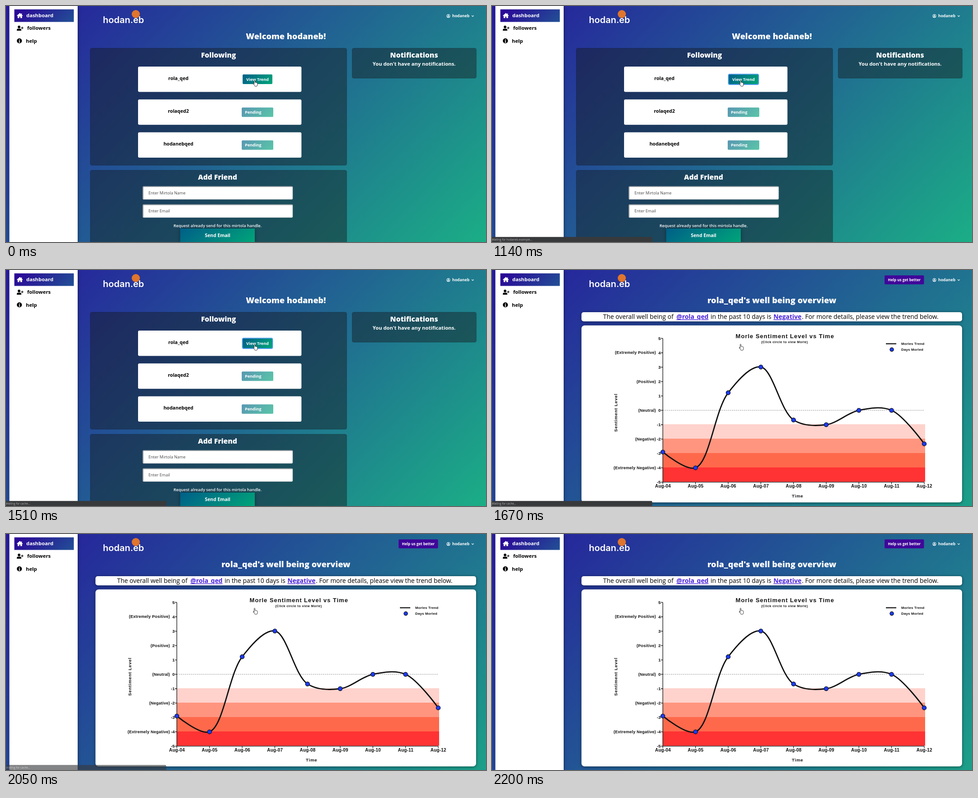
Recreate the animation shown at these times as an HTML page. Size 1065 by 526 pixels, loop 2.37 s.

```html
<!DOCTYPE html>
<html lang="en">
<head>
<meta charset="utf-8">
<title>Well being dashboard</title>
<style>
  html, body { margin: 0; width: 100%; height: 100%; overflow: hidden; background: #fff; }
  svg { display: block; width: 1065px; height: 526px; }
  text { font-family: "Open Sans", sans-serif; white-space: pre; }
  .mid { text-anchor: middle; }
  .white { fill: #fff; }
  .h3 { font-size: 18.1px; font-weight: 800; }
  .h4 { font-size: 15.7px; font-weight: 800; }
  .nav { font-size: 11.3px; font-weight: 700; }
  .friend { font-size: 10.6px; font-weight: 700; }
  .button { font-size: 9.1px; font-weight: 700; }
  .small { font-size: 9px; }
  .overview { font-size: 13.9px; font-weight: 500; }
  .link { font-weight: 700; fill: #4a22dc; text-decoration: underline; }
  .panel { fill: rgba(20, 25, 30, .45); stroke: rgba(0, 0, 0, .12); stroke-width: 2; }
  .card { fill: #fff; filter: drop-shadow(0 1px 3px rgba(0, 0, 0, .5)); }
  #chart text { font-family: "Liberation Sans", Arial, sans-serif; font-weight: 700; fill: #111; }
</style>
</head>
<body>
<svg viewBox="0 0 1065 526">
  <defs>
    <linearGradient id="homeSky" gradientUnits="userSpaceOnUse" x1="134.75" y1="-134.75" x2="930.25" y2="660.75">
      <stop stop-color="#271a9e"/><stop offset="1" stop-color="#1bae86"/>
    </linearGradient>
    <linearGradient id="trendSky" gradientUnits="userSpaceOnUse" x1="91.25" y1="-91.25" x2="973.75" y2="791.25">
      <stop stop-color="#271a9e"/><stop offset="1" stop-color="#1bae86"/>
    </linearGradient>
    <linearGradient id="green" x2="1.18" y2=".32">
      <stop stop-color="#005f88"/><stop offset="1" stop-color="#00a679"/>
    </linearGradient>
    <linearGradient id="violet" x2="1.16" y2=".25">
      <stop stop-color="#2b0397"/><stop offset="1" stop-color="#225096"/>
    </linearGradient>
  </defs>

  <g id="home">
    <rect width="1065" height="526" fill="url(#homeSky)"/>
    <text class="h3 white mid" x="621" y="74">Welcome hodaneb!</text>
    <rect class="panel" x="187" y="94" width="569" height="261" rx="4"/>
    <rect class="panel" x="187" y="366" width="569" height="180" rx="4"/>
    <rect class="panel" x="768" y="94" width="275.5" height="67" rx="4"/>
    <text class="h4 white mid" x="471.5" y="115">Following</text>
    <text class="h4 white mid" x="469.5" y="387">Add Friend</text>
    <text class="h4 white mid" x="905.5" y="115">Notifications</text>
    <text class="white mid" x="905.5" y="133" font-size="11.25" font-weight="700">You don't have any notifications.</text>
    <g id="friends"></g>
    <g id="inputs"></g>
    <text class="small white mid" x="469.5" y="492.5" font-weight="600">Request already send for this mirtola handle.</text>
    <rect x="386.5" y="496" width="165.5" height="34" fill="url(#green)" style="filter:drop-shadow(0 0 4px rgba(0,0,0,.35))"/>
    <text class="white mid" x="469.5" y="515" font-size="10.4" font-weight="700">Send Email</text>
    <rect id="ring" x="524.5" y="151.8" width="67" height="23.2" rx="3" fill="none" stroke="#4f9bf2" stroke-width="1.8"/>
  </g>

  <g id="trend">
    <rect width="1065" height="526" fill="url(#trendSky)"/>
    <text class="h3 white mid" x="621" y="74">rola_qed's well being overview</text>
    <rect class="card" x="198.5" y="94" width="844.5" height="20.5" rx="5"/>
    <rect class="card" x="198.5" y="123.5" width="844.5" height="394.5" rx="7"/>
    <g class="overview">
      <text x="246.5" y="109">The overall well being of</text>
      <text class="link mid" x="444.8" y="109">@rola_qed</text>
      <text x="485" y="109">in the past 10 days is</text>
      <text class="link" x="624.5" y="109">Negative</text>
      <text x="687.5" y="109">. For more details, please view the trend below.</text>
    </g>
    <g id="help">
      <rect x="871" y="12" width="87.5" height="20" rx="2" fill="#3f0799"/>
      <text class="white mid" x="914.8" y="25.2" font-size="8.1" font-weight="700">Help us get better</text>
    </g>
    <g id="chart"></g>
  </g>

  <rect x="7.5" width="151.5" height="526" fill="#fff" style="filter:drop-shadow(1px 0 3px rgba(0,0,0,.35))"/>
  <rect x="18.5" y="7.5" width="132" height="28" fill="url(#violet)"/>
  <g id="nav" class="nav"></g>
  <circle cx="288" cy="18" r="9" fill="#e0752d"/>
  <text class="white" x="215" y="37.5" style="font:600 20px Inter,sans-serif">hodan.eb</text>
  <text id="user" class="white" y="25.3" font-size="8.7" font-weight="700">hodaneb</text>

  <g id="icons">
    <path class="white" d="M30.7 15.5 24 21.5l1 1 .9-.8V27h3.6v-3.6h2.4V27h3.6v-5.3l.9.8 1-1-2.2-2v-3h-1.5v1.7z"/>
    <circle cx="29" cy="46.7" r="2.9"/>
    <path d="M24 55v-1.4q0-3 3-3h4q3 0 3 3V55zM35.3 46.2h1.4v2h2v1.4h-2v2h-1.4v-2h-2v-1.4h2z"/>
    <circle cx="29.7" cy="77.6" r="5.6"/>
    <path d="M29.7 74v1.8M28.6 77.2h1.3v3.5M28.3 80.7h2.8" stroke="#fff" stroke-width="1.4" fill="none"/>
    <g fill="none" stroke="#fff">
      <circle cx="981.5" cy="22.3" r="3.7"/>
      <path d="M978.9 24.8q2.6-2 5.2 0" stroke-width="1.4"/>
      <path d="m1033.2 21.2 2.3 2.3 2.3-2.3" stroke-width="1.2"/>
    </g>
    <circle class="white" cx="981.5" cy="21.2" r="1.4"/>
  </g>

  <circle id="click" cx="551" cy="166" r="6" fill="#b4d21c"/>
  <path fill="#fff" stroke="#222" stroke-width=".9" stroke-linejoin="round"
    d="M550.5 174.5V166.5q0-1.3 1-1.3t1 1.3v3.7q2.2-.4 2.4.5 1.7-.2 1.9.5 1.1 0 1.1 1.3v2.8q0 1.7-1.2 3.5h-4.4q-1.3-2.3-3.7-5.2-.4-1.2.5-1.3.7 0 1.4 1z"/>

  <g id="status">
    <path d="M0 514.8h353.5q2 0 2 2V526H0z" fill="#38393b"/>
    <text id="statusText" x="-1" y="522.8" font-size="6.2" fill="#b4b4b4"></text>
  </g>
</svg>
<script>
const $ = id => document.getElementById(id);
const text = (x, y, label, attrs = "") => `<text x="${x}" y="${y}" ${attrs}>${label}</text>`;
const line = (d, attrs) => `<path d="${d}" fill="none" ${attrs}/>`;

$("friends").innerHTML = ["rola_qed", "rolaqed2", "hodanebqed"].map((name, i) => {
  const y = 135 + 73.2 * i;
  const button = i
    ? `<rect x="523" y="${y + 18}" width="70" height="21" rx="2" fill="url(#green)" opacity=".65"/>` +
      text(530, y + 31.8, "Pending", 'class="button white"')
    : `<rect x="525" y="${y + 17.5}" width="66" height="21.5" rx="2" fill="url(#green)"/>` +
      text(558, y + 31.8, "View Trend", 'class="button white mid"');
  return `<rect x="293" y="${y}" width="362.5" height="56.5" rx="3" fill="#fff"/>` +
    text(382.5, y + 30, name, 'class="friend mid"') + button;
}).join("");

$("inputs").innerHTML = ["Enter Mirtola Name", "Enter Email"].map((label, i) => {
  const y = 402 + 40.4 * i;
  return `<rect x="303.5" y="${y}" width="332.5" height="29" rx="2" fill="#fff" stroke="#b8bcc0" stroke-width=".8"/>` +
    line(`M304.3 ${y + 28}V${y + .8}H635`, 'stroke="#7d8286" stroke-width="1.1"') +
    text(316, y + 17.5, label, 'class="small" fill="#444"');
}).join("");

$("nav").innerHTML = ["dashboard", "followers", "help"].map((label, i) =>
  text(30, 25.2 + 28.2 * i, label, i ? "" : 'class="white"')).join("");

// Chart
const left = 379, right = 959, step = 72.5;
const yOf = level => 312.7 - 32.05 * level;
const points = [-2.9, -4, 1.22, 3.01, -.67, -1, 0, 0, -2.33].map((v, i) => [left + step * i, yOf(v)]);

// Centripetal Catmull-Rom spline as Bezier segments
function spline(pts) {
  const span = (a, b) => Math.sqrt(Math.hypot(b[0] - a[0], b[1] - a[1]));
  const tangent = (i, k) => {
    const [a, b, c] = [pts[i - 1], pts[i], pts[i + 1]];
    if (!a || !c) return 0;
    const d = span(a, b), e = span(b, c);
    return (b[k] - a[k]) / d - (c[k] - a[k]) / (d + e) + (c[k] - b[k]) / e;
  };
  let d = "M" + pts[0];
  for (let i = 1; i < pts.length; i++) {
    const third = span(pts[i - 1], pts[i]) / 3;
    const control = (j, sign) => [0, 1].map(k => pts[j][k] + sign * third * tangent(j, k));
    d += `C${control(i - 1, 1)} ${control(i, -1)} ${pts[i]}`;
  }
  return d;
}

const dot = ([x, y], r) => `<circle cx="${x}" cy="${y}" r="${r}" fill="#1c3bff" stroke="#111" stroke-width="1.3"/>`;
const levelNames = {
  4: "(Extremely Positive)", 2: "(Positive)", 0: "(Neutral)", "-2": "(Negative)", "-4": "(Extremely Negative)"
};

let chart = ["#ffd2cc", "#ff957f", "#ff694b", "#ff3333"].map((color, i) =>
  `<rect x="${left}" y="${yOf(-1 - i) - 1}" width="582" height="32.1" fill="${color}"/>`).join("");
chart += line(`M${left} ${yOf(0)}H${right}`, 'stroke="#999" stroke-dasharray="3 1.5"');
let axes = `M${left} ${yOf(5)}V${yOf(-5)}H${right}`;
for (let v = -5; v <= 5; v++) {
  axes += `M${left} ${yOf(v)}h-4`;
  chart += text(374.3, yOf(v) + 3.4, v, 'text-anchor="end" font-size="9.7"');
  if (levelNames[v])
    chart += text(363.7, yOf(v) + 2.9, levelNames[v], 'text-anchor="end" font-size="9.1" letter-spacing=".2"');
}
points.forEach(([x], i) => {
  axes += `M${x} ${yOf(-5)}v4`;
  chart += text(x + .3, 485.3, "Aug-" + String(i + 4).padStart(2, 0), 'class="mid" font-size="10" letter-spacing=".2"');
});
chart += line(axes, 'stroke="#111" stroke-width="1.3"') +
  line(spline(points), 'stroke="#111" stroke-width="2.8"') +
  points.map(p => dot(p, 4.6)).join("") +
  text(650, 152, "Morle Sentiment Level vs Time", 'class="mid" font-size="13" letter-spacing="1"') +
  text(649.3, 163.3, "(Click circle to view Morle)", 'class="mid" font-size="7.15" letter-spacing=".5"') +
  text(678, 506.8, "Time", 'class="mid" font-size="9.75" letter-spacing=".7"') +
  text(0, 0, "Sentiment Level", 'class="mid" font-size="9.75" letter-spacing=".7" transform="translate(277.5 318) rotate(-90)"') +
  line("M874 164.4h23", 'stroke="#111" stroke-width="2.3"') + dot([887, 177.3], 4.1) +
  text(908, 167.2, "Morles Trend", 'font-size="7.8" letter-spacing=".25"') +
  text(908, 180.2, "Days Morled", 'font-size="7.8" letter-spacing=".25"');
$("chart").innerHTML = chart;

const show = (id, visible) => $(id).style.display = visible ? "" : "none";

function draw(t) {
  const loading = t >= 1590 && t < 1670;
  show("home", t < 1590);
  show("trend", t >= 1590);
  show("chart", t >= 1670);
  show("icons", !loading);
  show("ring", t >= 1070);
  show("click", t >= 970 && t < 1140);
  $("click").setAttribute("opacity", t < 1070 ? .8 : .45);

  [...$("nav").children].forEach((label, i) => label.setAttribute("x", loading ? 30 : [45, 47, 44][i]));
  $("user").setAttribute("x", loading ? 995 : 990);
  $("help").setAttribute("transform", `translate(${loading ? 16 : 0})`);

  show("status", t >= 1140 && t < 2200);
  $("status").setAttribute("opacity", t < 2050 ? 1 : t < 2140 ? .62 : .3);
  $("statusText").textContent = t < 1510 ? "Waiting for hodaneb.example..." : "Waiting for cache...";
}

function tick() {
  draw(performance.now() % 2370);
  requestAnimationFrame(tick);
}
tick();
</script>
</body>
</html>
```
